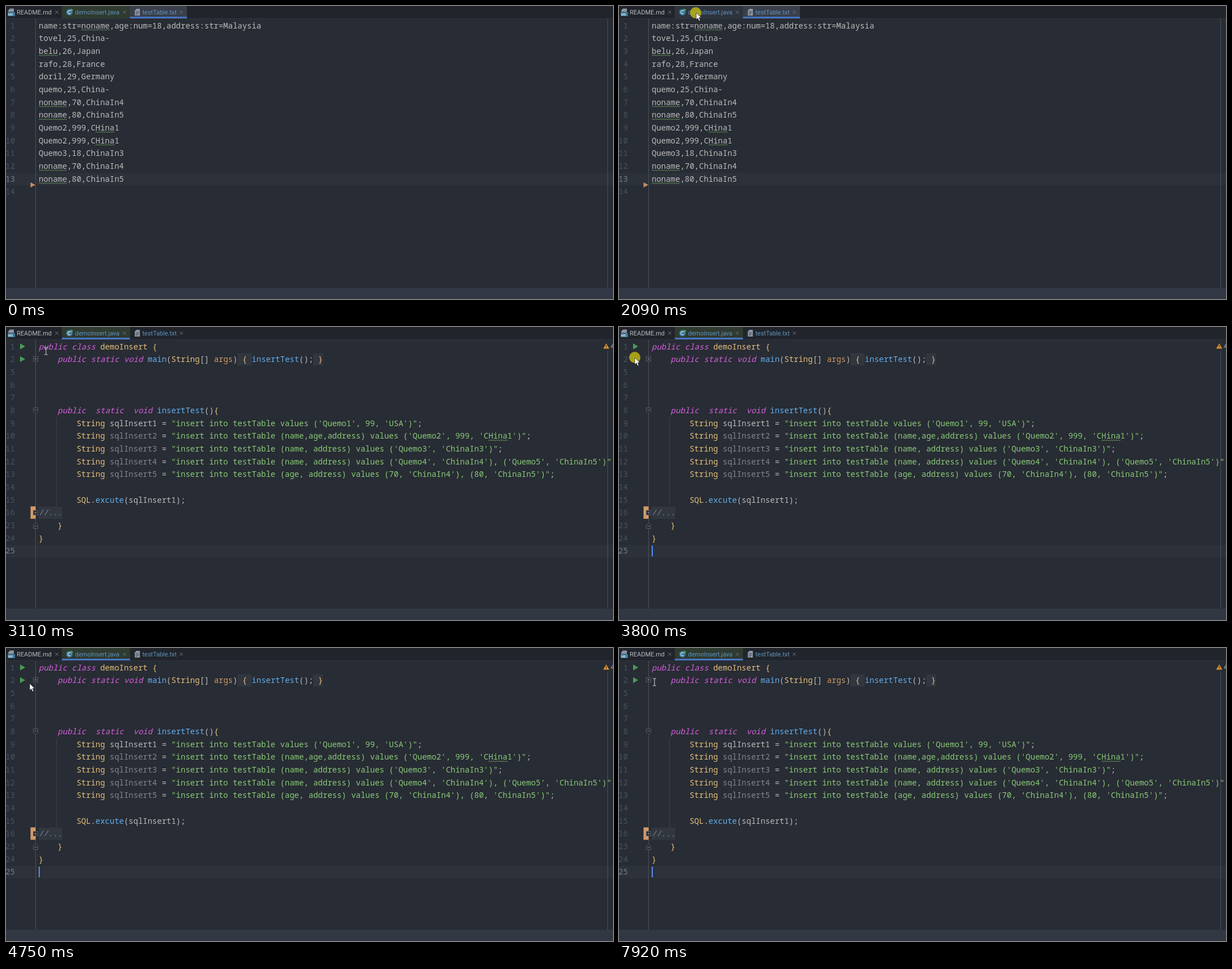
Animation, 1077 px wide and 520 px high, one loop 7990 ms. Source, as an HTML page:

```html
<!DOCTYPE html>
<html lang="en">
<head>
<meta charset="utf-8">
<title>Editor demo</title>
<style>
  html, body { margin: 0; width: 100%; height: 100%; overflow: hidden; background: #282c34; }
  svg { display: block; width: 1077px; height: 520px; }
  text { white-space: pre; }
  .code { font: 14px "Noto Sans Mono", monospace; fill: #bbbbbb; }
  .num { fill: #495162; text-anchor: end; }
  .num.on { fill: #737d8c; }
  .ui { font: 11px Roboto, "Noto Sans CJK SC", sans-serif; fill: #b4b9c2; }
  .blue { fill: #5f93c0; }
  .cjk { font-size: 10px; font-family: "Noto Sans CJK SC", "Noto Sans CJK", sans-serif; }
  .k { fill: #d55fde; font-style: italic; }
  .t { fill: #e5c07b; }
  .f { fill: #61afef; }
  .s { fill: #89ca78; }
  .a { fill: #d19a66; }
  .u { fill: #7f8592; }
  .c { fill: #7d8799; font-style: italic; }
  .line { fill: none; stroke: #4b5059; }
  .wave { fill: none; stroke: #6a9a5f; stroke-width: 1; }
</style>
</head>
<body>
<svg id="stage" viewBox="0 0 1077 520" xmlns="http://www.w3.org/2000/svg"></svg>
<script>
const LOOP = 7990, ROW = 22.68, CHAR = 8.4, LEFT = 58;
const stage = document.getElementById('stage');
const rowMid = i => 34.8 + i * ROW;
const col = n => LEFT + n * CHAR;

const rect = (x, y, w, h, fill, extra = '') =>
  `<rect x="${x}" y="${y}" width="${w}" height="${h}" fill="${fill}" ${extra}/>`;
const path = (d, attrs) => `<path d="${d}" ${attrs}/>`;
const label = (x, y, str, cls = 'ui') => `<text x="${x}" y="${y}" class="${cls}">${str}</text>`;

function wave(row, from, length) {
  const x = col(from), steps = Math.round(length * CHAR / 2);
  let d = `M${x} ${rowMid(row) + 8.5}`;
  for (let i = 0; i < steps; i++) d += `l2 ${i % 2 ? 2 : -2}`;
  return path(d, 'class="wave"');
}

const lineNumber = (n, row, active) =>
  label(15.8, rowMid(row) + 4.7, n, 'code num' + (active ? ' on' : ''));
const codeLine = (markup, row) => label(LEFT, rowMid(row) + 4.7, markup, 'code');
const rowHighlight = row => rect(0, rowMid(row) - 11.3, 1077, 22.6, '#2c313a');
const gutter = path('M52.5 22V500', 'class="line"');

/* Table file */
const records = [
  'name:str=noname,age:num=18,address:str=Malaysia',
  'tovel,25,China-', 'belu,26,Japan', 'rafo,28,France', 'doril,29,Germany', 'quemo,25,China-',
  'noname,70,ChinaIn4', 'noname,80,ChinaIn5', 'Quemo2,999,CHina1', 'Quemo2,999,CHina1',
  'Quemo3,18,ChinaIn3', 'noname,70,ChinaIn4', 'noname,80,ChinaIn5', ''
];

function tableView() {
  const body = records.map((text, row) => {
    const waves = ['noname', 'belu', 'Hina'].map(word => {
      const at = text.search(word === 'Hina' ? /Hina/ : word);
      return at < 0 ? '' : wave(row, at, word.length);
    });
    return lineNumber(row + 1, row, row === 12) + codeLine(text, row) + waves.join('');
  });
  return rowHighlight(12) + gutter + path('M1067.5 22V500', 'class="line"') + body.join('') +
    path('M43.5 313L52 317.5L43.5 322Z', 'fill="#c98f60"');
}

/* Java file */
const source = [
  [1, 'public class demoInsert {'],
  [2, '    public static void main(String[] args) { insertTest(); }'],
  [5, ''], [6, ''], [7, ''],
  [8, '    public  static  void insertTest(){'],
  [9, `        String sqlInsert1 = "insert into testTable values ('Quemo1', 99, 'USA')";`],
  [10, `        String sqlInsert2 = "insert into testTable (name,age,address) values ('Quemo2', 999, 'CHina1')";`],
  [11, `        String sqlInsert3 = "insert into testTable (name, address) values ('Quemo3', 'ChinaIn3')";`],
  [12, `        String sqlInsert4 = "insert into testTable (name, address) values ('Quemo4', 'ChinaIn4'), ('Quemo5', 'ChinaIn5')";`],
  [13, `        String sqlInsert5 = "insert into testTable (age, address) values (70, 'ChinaIn4'), (80, 'ChinaIn5')";`],
  [14, ''],
  [15, '        SQL.excute(sqlInsert1);'],
  [16, '//...'],
  [23, '    }'], [24, '}'], [25, '']
];

const rules = [
  ['s', /^"/], ['c', /^\/\//], ['k', /^(public|class|static|void)$/],
  ['t', /^(demoInsert|String|SQL|[{}])$/], ['f', /^(main|insertTest|excute)$/],
  ['a', /^args$/], ['u', /^sqlInsert[2-5]$/]
];

function highlight(text) {
  return text.replace(/"[^"]*"|\/\/.*|\w+|[{}]/g, token => {
    const rule = rules.find(([, test]) => test.test(token));
    return rule ? `<tspan class="${rule[0]}">${token}</tspan>` : token;
  });
}

const play = (x, y) => path(`M${x} ${y - 5.2}l9 5.2l-9 5.2Z`, 'fill="#499c54"');
const foldBox = row => {
  const y = Math.round(rowMid(row)) - 4.5;
  return rect(48.5, y, 8, 8, '#282c34', 'stroke="#565c66"') +
    path(`M50.5 ${y + 4}h4M52.5 ${y + 2}v4`, 'stroke="#7a808a"');
};
const foldEnd = (row, dir) => {
  const y = Math.round(rowMid(row)) + .5;
  return path(`M48.5 ${y - 5 * dir}h8v${6 * dir}l-4 ${4 * dir}l-4 ${-4 * dir}Z`,
    'fill="#282c34" stroke="#565c66"') + path(`M50.5 ${y - dir}h4`, 'stroke="#7a808a"');
};

function javaView() {
  const folded = (row, from, length) =>
    rect(col(from), rowMid(row) - 11, length * CHAR, 22, '#31363f');
  const body = source.map(([n, text], row) => {
    const at = text.indexOf('Hina1');
    return lineNumber(n, row, n === 25) + codeLine(highlight(text), row) +
      (at < 0 ? '' : wave(row, at, 4));
  });
  return rowHighlight(16) + gutter + path('M1067.5 42V500', 'class="line"') +
    path('M89.5 160V318', 'stroke="#3b4048"') +
    folded(1, 42, 3) + folded(1, 58, 2) + folded(13, 0, 5) +
    rect(43.5, rowMid(13) - 11.3, 9, 22, '#d19a66') + body.join('') +
    play(25, 34.5) + play(25, 57) +
    foldBox(1) + foldBox(13) + foldEnd(5, 1) + foldEnd(14, -1) +
    path('M1065 29L1070.3 38.5H1059.7Z', 'fill="#e0912f"') +
    path('M1065 32v3M1065 36v1.3', 'stroke="#282c34" stroke-width="1.2"') +
    label(1073, 38, '4');
}

/* Tabs */
const closeMark = x => path(`M${x - 2.8} 8.2l5.6 5.6m0-5.6l-5.6 5.6`, 'stroke="#69707c"');
const sheet = (x, fill) => path(`M${x + 3} 5h6v12h-9v-9Z`, `fill="${fill}"`);

const tabs =
  rect(0, 0, 1077, 22, '#21252b') +
  '<rect id="javaTab" x="99" y="0" width="121" height="22"/>' +
  '<rect id="tableTab" x="220" y="0" width="101" height="22" fill="#3a3f4b"/>' +
  '<rect id="underline" y="19" height="3" fill="#4774c4"/>' +
  path('M0 22.5H1077', 'stroke="#30353e"') +
  path('M7 4.5h7v6h-10v-3Z', 'fill="#8a96a3"') + rect(3, 11, 13, 7, '#3d7899') +
  '<text x="4" y="17" font-family="Roboto, sans-serif" font-size="5.5" font-weight="700" fill="#d2e0e8">MD</text>' +
  label(19, 15, 'README.md') + closeMark(90) +
  '<circle cx="112.5" cy="11" r="5.8" fill="#3a7a9c"/>' +
  path('M114.6 9.2a2.8 2.8 0 1 0 0 3.6', 'fill="none" stroke="#cfdde5" stroke-width="1.2"') +
  path('M115 4.5l4.5 2.6l-4.5 2.6Z', 'fill="#55a860"') +
  label(122.5, 15, 'demoInsert.java', 'ui blue') + closeMark(210) +
  sheet(228.5, '#8d98a5') + path('M230.5 10h5M230.5 12.5h5M230.5 15h3', 'stroke="#3a3f4b"') +
  label(242, 15, 'testTable.txt', 'ui blue') + closeMark(311);

/* Run menu */
const entry = "'demoInsert.main()'";
const menuRows = [
  [[49, '运行'], [72, entry + '(U)'], [252, 'Ctrl+Shift+F10']],
  [[49, '调试'], [72, entry + '(D)']],
  [[49, '使用覆盖率运行'], [126, entry + '(<tspan text-decoration="underline">V</tspan>)']],
  [[49, '使用'], [72, "'Lumenor Async Profiler'"], [195, '运行'], [222, entry]],
  [[49, '使用'], [72, "'Java Flight Recorder'"], [180, '运行'], [207, entry]],
  [[49, '修改运行配置...']]
];
const menuY = i => 63.3 + i * 17.7;

function menuView() {
  const texts = menuRows.map((parts, i) => parts.map(([x, str]) =>
    label(x, menuY(i) + 4, str, /[\u4e00-\u9fff]/.test(str) ? 'ui cjk' : 'ui')).join(''));
  const clock = i => `<circle cx="37" cy="${menuY(i) - .5}" r="4.6" fill="none" stroke="#9aa3ad" stroke-width="1.3"/>` +
    path(`M37 ${menuY(i) - 3}v3h2`, 'fill="none" stroke="#9aa3ad"') +
    path(`M39 ${menuY(i) - .5}l5 3l-5 3Z`, `fill="${i === 3 ? '#55a860' : '#c75450'}"`);
  const bugY = menuY(1);
  return rect(28.5, 54.5, 303, 106, '#21252b', 'stroke="#333842"') +
    '<rect id="hot" x="29" y="55" width="303" height="17" fill="#4d78cc"/>' + texts.join('') +
    path('M72 69.5h3M72 87.5h3', 'stroke="#b4b9c2" stroke-width=".8"') +
    path('M34.5 58.5l8 4.7l-8 4.7Z', 'fill="#499c54"') +
    `<ellipse cx="38" cy="${bugY}" rx="3.3" ry="4.8" fill="#55a05e"/>` +
    path(`M33 ${bugY - 3.5}l10 7M33 ${bugY}h10M33 ${bugY + 3.5}l10-7`, 'stroke="#55a05e" stroke-width="1.2"') +
    path(`M32.5 ${menuY(2) - 4}l4-1l4 1v4q-1 4-4 5q-3-1-4-5Z`, 'fill="#9aa3ad"') +
    path(`M36.5 ${menuY(2) - 3.5}v7q2-1 2.5-3v-3.5Z`, 'fill="#21252b"') +
    path(`M39 ${menuY(2) - .5}l5 3l-5 3Z`, 'fill="#55a860"') +
    clock(3) + clock(4);
}

stage.innerHTML =
  rect(0, 0, 1077, 520, '#282c34') +
  `<g id="table">${tableView()}</g><g id="java">${javaView()}` +
  rect(58, 388, 2, 19, '#568df5', 'id="caret"') + '</g>' +
  rect(0, 500, 1077, 20, '#323843') + tabs +
  `<g id="menu">${menuView()}</g>` +
  '<circle id="click" r="10" fill="#b8ae14" fill-opacity=".88"/>' +
  '<g id="pointer">' +
  path('M0 0V12.3L2.9 9.6L5 14.4L7.2 13.4L5.1 8.8H9Z', 'id="arrow" fill="#fff" stroke="#15181c" stroke-width=".7"') +
  path('M-3 -6.5H-1L0 -5.5L1 -6.5H3M0 -5.5V5.5M-3 6.5H-1L0 5.5L1 6.5H3', 'id="beam" fill="none" stroke="#d8dade"') +
  '</g>';

/* Pointer stops: time, x, y */
const stops = [
  [600, 808, 441], [670, 640, 369], [740, 475, 302], [1010, 369, 198], [1070, 263, 98],
  [1340, 232, 74], [1410, 190, 46], [1480, 148, 20], [1540, 116, 8], [1610, 108, 5],
  [1680, 124, 9], [1750, 137, 12]
];
for (let i = 1; i <= 12; i++) {
  const p = i / 12, ease = p * p * (3 - 2 * p);
  stops.push([2680 + (i - 1) * 71, 137 - 106 * ease, 12 + 49 * ease]);
}
stops.push([3530, 24, 57], [3610, 28, 54.5], [4140, 35, 59], [4210, 42, 63], [7920, 63, 60.5]);

const caretOff = [[2820, 3320], [3870, 4750], [5400, 5870], [6390, 6850], [7390, 7920]];
const clicks = [[2090, 2280, 136, 12], [3800, 3870, 28, 54], [4470, 4670, 42, 62]];

const el = id => document.getElementById(id);
const within = (t, [from, to]) => t >= from && t < to;
const show = (id, on) => el(id).setAttribute('display', on ? 'inline' : 'none');
const set = (id, attrs) => Object.entries(attrs).forEach(([k, v]) => el(id).setAttribute(k, v));

function render(t) {
  const java = t >= 2280;
  show('java', java);
  show('table', !java);
  show('tableTab', !java);
  set('underline', java ? { x: 99, width: 121 } : { x: 220, width: 101 });
  show('caret', !caretOff.some(span => within(t, span)));
  show('menu', within(t, [4000, 4750]));
  show('hot', t >= 4140);

  const stop = stops.filter(s => s[0] <= t).pop();
  const [, x, y] = stop || [0, -50, -50];
  const beam = x > 52 && y > 22;
  set('pointer', { transform: `translate(${x} ${y})` });
  show('pointer', stop);
  show('beam', beam);
  show('arrow', !beam);
  const hover = y > 0 && y < 22 && x > 99 && x < 220;
  set('javaTab', { fill: hover ? '#2e343d' : '#2f3a30' });

  const click = clicks.find(c => within(t, c));
  show('click', click);
  if (click) set('click', { cx: click[2], cy: click[3] });
}

const start = performance.now();
function tick() {
  render((performance.now() - start) % LOOP);
  requestAnimationFrame(tick);
}
tick();
</script>
</body>
</html>
```
